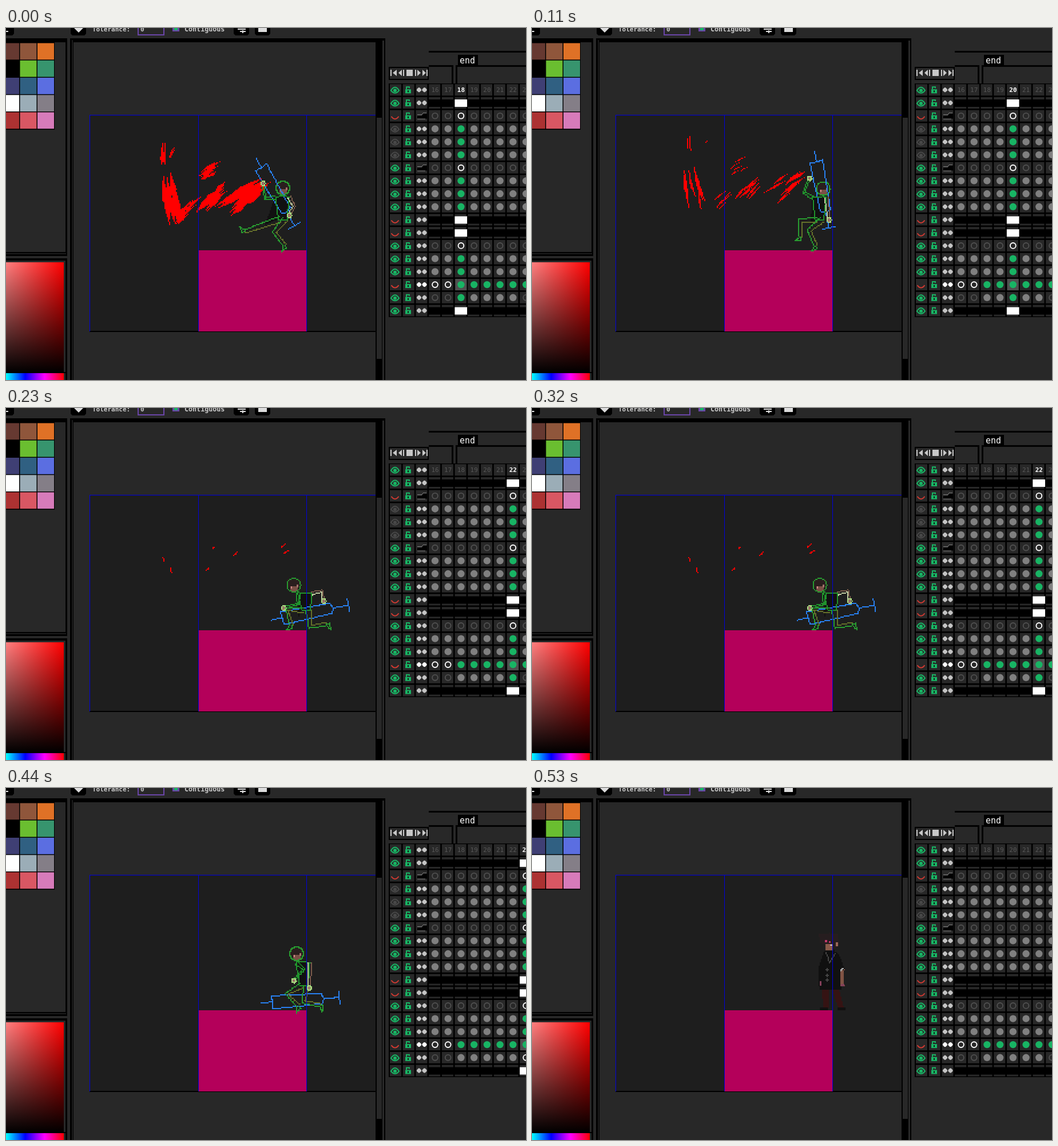
Write an HTML page with a canvas that moves like this. It is 909 px wide and 616 px high and loops after 0.56 s.

```html
<!DOCTYPE html>
<html lang="en">
<head>
<meta charset="utf-8">
<title>Pixel editor</title>
<style>
html, body { margin: 0; width: 100%; height: 100%; overflow: hidden; background: #282828; }
canvas { display: block; }
</style>
</head>
<body>
<canvas id="stage" width="909" height="616"></canvas>
<script>
const stage = document.getElementById('stage');
let g = stage.getContext('2d');
const GREY = '#282828', GREEN = '#18b464', PX = 2;
const MONO = '"DejaVu Sans Mono", monospace';

function box(color, x, y, w, h) {
  g.fillStyle = color;
  g.fillRect(x, y, w, h);
}
function dot(color, x, y, r) {
  g.fillStyle = color;
  g.beginPath();
  g.arc(x, y, r, 0, 7);
  g.fill();
}
function ring(color, x, y, r, w = 2) {
  g.strokeStyle = color;
  g.lineWidth = w;
  g.beginPath();
  g.arc(x, y, r, 0, 7);
  g.stroke();
}
function shape(color, d, x = 0, y = 0, stroke = 0) {
  g.save();
  g.translate(x, y);
  g.lineWidth = stroke;
  g.fillStyle = g.strokeStyle = color;
  stroke ? g.stroke(new Path2D(d)) : g.fill(new Path2D(d));
  g.restore();
}
function label(str, x, y, size, color, align = 'left', weight = '') {
  g.font = `${weight} ${size}px ${MONO}`;
  g.textAlign = align;
  g.fillStyle = color;
  g.fillText(str, x, y);
}

// Points and vectors
const add = (a, b, k = 1) => [a[0] + b[0] * k, a[1] + b[1] * k];
const mix = (a, b, k) => [a[0] + (b[0] - a[0]) * k, a[1] + (b[1] - a[1]) * k];
const turn = ([x, y]) => [-y, x];
const polar = (deg, r = 1) => [r * Math.cos(deg * Math.PI / 180), r * Math.sin(deg * Math.PI / 180)];
const gap = (a, b) => Math.hypot(b[0] - a[0], b[1] - a[1]);
const unit = (a, b) => {
  const d = gap(a, b) || 1;
  return [(b[0] - a[0]) / d, (b[1] - a[1]) / d];
};

// Blocky drawing on the sprite's pixel grid
const snap = v => Math.round(v / PX) * PX;

function pixelLine(color, ...pts) {
  g.fillStyle = color;
  for (let i = 1; i < pts.length; i++) {
    const n = Math.max(1, Math.ceil(gap(pts[i - 1], pts[i]) / PX));
    for (let k = 0; k <= n; k++) {
      const [x, y] = mix(pts[i - 1], pts[i], k / n);
      g.fillRect(snap(x) - 1, snap(y) - 1, PX, PX);
    }
  }
}
function pixelFill(color, ...pts) {
  g.fillStyle = color;
  const ys = pts.map(p => p[1]);
  for (let y = snap(Math.min(...ys)); y <= Math.max(...ys); y += PX) {
    const cuts = [];
    pts.forEach(([x0, y0], i) => {
      const [x1, y1] = pts[(i + 1) % pts.length];
      if ((y0 <= y) !== (y1 <= y)) cuts.push(x0 + (y - y0) * (x1 - x0) / (y1 - y0));
    });
    cuts.sort((a, b) => a - b);
    for (let i = 0; i + 1 < cuts.length; i += 2) {
      const x = snap(cuts[i]);
      g.fillRect(x - 1, y - 1, Math.max(PX, snap(cuts[i + 1]) - x), PX);
    }
  }
}
function pixelRing(color, at, r) {
  const pts = [];
  for (let a = 0; a <= 360; a += 15) pts.push(add(at, polar(a, r)));
  pixelLine(color, ...pts);
}

// Red smears: each is a bundle of spindles that drifts, thins and dies out
const smears = [
  { at: [276, 232], len: 54, wide: 9, tilt: 88, count: 5, drift: [0, -9] },
  { at: [291, 217], len: 34, wide: 4, tilt: -61, count: 3, drift: [7, -10] },
  { at: [287, 301], len: 74, wide: 30, tilt: 78, count: 18, drift: [-4, -9] },
  { at: [318, 319], len: 56, wide: 16, tilt: -44, count: 9, drift: [11, -12] },
  { at: [357, 250], len: 46, wide: 17, tilt: -32, count: 9, drift: [3, -5] },
  { at: [364, 296], len: 66, wide: 22, tilt: -43, count: 11, drift: [10, -9] },
  { at: [416, 294], len: 92, wide: 32, tilt: -36, count: 17, drift: [14, -11] }
];
function random(seed) {
  return () => {
    seed = (seed * 1664525 + 1013904223) % 4294967296;
    return seed / 4294967296;
  };
}
function drawSmear({ at, len, wide, tilt, count, drift }, seed, age) {
  const rnd = random(seed * 7919 + 17);
  rnd();
  for (let i = 0; i < count; i++) {
    const u = rnd() - 0.5, v = rnd() - 0.5;
    const dir = polar(tilt + (rnd() - 0.5) * 14), side = turn(dir);
    const reach = len * (0.2 + 0.22 * rnd()) * (1 - 0.15 * age);
    const thick = wide * (0.1 + 0.1 * rnd()) * (1 - age / 4);
    const life = i / count;
    if (life < age * 0.21) continue;
    let mid = add(at, drift, age);
    mid = add(mid, dir, u * len * 0.6);
    mid = add(mid, side, v * wide * (0.9 + 0.15 * age));
    const tail = add(mid, dir, -reach), tip = add(mid, dir, reach);
    if (thick < 0.6) pixelLine('#f00', mix(tail, tip, 0.3), mix(tail, tip, 0.7));
    else pixelFill('#f00', tail, add(mid, side, thick), tip, add(mid, side, -thick));
  }
}

// Key points of each pose; elbows, knees, feet and blade follow from them
const poses = [
  { ms: 60, head: [484, 280], hip: [483, 335], hands: [[449, 272], [495, 328]], ankles: [[418, 356], [487, 380]], sword: [437, 227, 60.5] },
  { ms: 50, head: [503, 281], hip: [496, 335], hands: [[474, 264], [511, 333]], ankles: [[434, 353], [497, 380]], sword: [475, 217, 74.7] },
  { ms: 50, head: [509, 281], hip: [502, 336], hands: [[485, 263], [519, 336]], ankles: [[470, 366], [496, 381]], sword: [494, 215, 79.7] },
  { ms: 70, head: [505, 304], hip: [521, 350], hands: [[477, 346], [551, 338]], ankles: [[493, 380], [553, 378]], sword: [454, 366, -5] },
  { ms: 150, head: [503, 310], hip: [524, 354], hands: [[485, 350], [555, 338]], ankles: [[499, 380], [560, 378]], sword: [464, 371, -11] },
  { ms: 100, head: [508, 290], hip: [520, 346], hands: [[503, 337], [530, 350]], ankles: [[511, 381], [549, 380]], sword: [446, 376, -4] },
  { ms: 80 }
];

// Middle joint of a two-bone limb
function bend(a, b, la, lb, side) {
  const d = gap(a, b), dir = unit(a, b);
  const along = d > la + lb ? d * la / (la + lb) : (la * la - lb * lb + d * d) / (2 * d);
  const out = Math.sqrt(Math.max(0, la * la - along * along)) * (d < la + lb);
  return add(add(a, dir, along), turn(dir), side * out);
}
function limb(colors, a, j, b, w) {
  const n1 = turn(unit(a, j)), n2 = turn(unit(j, b));
  [w, -w].forEach((k, i) => pixelLine(colors[i],
    add(a, n1, k), add(j, mix(n1, n2, 0.5), k * 0.85), add(b, n2, k * 0.6)));
}
function drawLeg(hip, ankle) {
  const knee = bend(hip, ankle, 29, 29, 1), shin = unit(knee, ankle);
  limb(['#289c30', '#66702a'], hip, knee, ankle, 5);
  const heel = add(ankle, shin, 6), toe = add(heel, turn(shin), 11);
  pixelLine('#289c30', add(ankle, turn(shin), 3), toe, heel, ankle);
}
function drawSword([x, y, deg]) {
  const dir = polar(deg), side = turn(dir);
  const at = (along, across) => add(add([x, y], dir, along), side, across);
  const c = '#2880f0';
  pixelLine(c, at(0, 0), at(18, 0));
  pixelLine(c, at(20, 0), at(18, -11), at(106, -9), at(110, 0), at(106, 9), at(20, 12), at(20, 0));
  pixelLine(c, at(110, 0), at(137, 0));
  pixelLine(c, at(137, -11), at(137, 11));
}
function drawHead([x, y]) {
  box('#2a1e1e', x - 12, y - 10, 25, 14);
  box('#7a5046', x - 6, y + 2, 13, 9);
  box('#d08888', x - 5, y + 2, 2, 4);
  box('#a07068', x + 5, y - 1, 3, 5);
  pixelRing('#289c30', [x, y], 12);
}
function drawFighter({ head, hip, hands, ankles, sword }) {
  const neck = add(head, unit(head, hip), 14);
  const chest = [neck[0] + (hip[0] - neck[0]) * 0.9, neck[1] + 2];
  const shoulders = [add(chest, [-12, 0]), add(chest, [12, 0])];
  const hips = [add(hip, [-7, 0]), add(hip, [8, 0])];
  const tail = mix(hip, ankles[0], 0.45);
  pixelFill('#111', shoulders[0], shoulders[1], hips[1], hips[0], tail);
  drawHead(head);
  drawSword(sword);
  ankles.forEach((a, i) => drawLeg(mix(hip, hips[i], 0.6), a));
  pixelLine('#20922c', shoulders[0], hips[0], hips[1], shoulders[1], neck, shoulders[0]);
  const sleeves = [['#20922c', '#20922c'], ['#c0cba0', '#7a5a4a']];
  hands.forEach((h, i) => {
    const s = shoulders[i];
    limb(sleeves[i], s, bend(s, h, 18, i ? 18 : 27, -1), h, 3);
    box('#9a7268', h[0] - 3, h[1] - 3, 6, 6);
    pixelRing('#a8dd80', h, 4);
  });
}
function drawStanding() {
  for (const [x, lean] of [[508, 4], [526, 12]]) {
    pixelFill('#351313', [x, 352], [x + 12, 352], [x + 8 + lean, 385], [x + lean - 2, 385]);
    box('#121010', x + lean * 1.6 - 11, 384, 14, 5);
  }
  pixelFill('#101010', [511, 286], [528, 284], [538, 292], [548, 318], [541, 322], [542, 352], [505, 353], [501, 340], [503, 310]);
  pixelFill('#805344', [540, 320], [545, 318], [547, 346], [540, 347]);
  pixelFill('#261d1f', [502, 256], [520, 254], [536, 255], [538, 276], [528, 282], [505, 271]);
  box('#8a5a4a', 513, 273, 13, 11);
  box('#c0386a', 512, 266, 4, 4);
  box('#c0386a', 519, 268, 3, 3);
  box('#9a6658', 531, 270, 4, 7);
  box('#cfc5c5', 521, 274, 4, 2);
  pixelLine('#454545', [514, 288], [520, 305], [529, 290]);
  for (let y = 318; y < 340; y += 9) {
    pixelLine('#454545', [514, y], [518, y]);
    pixelLine('#454545', [516, y - 2], [516, y + 2]);
  }
  pixelLine('#a8a8a8', [539, 319], [544, 315]);
  box('#84405a', 503, 338, 3, 8);
  box('#84405a', 540, 343, 6, 4);
}

// Timeline
const STEP = 22.72, rowY = i => 108.3 + STEP * i, colX = f => 750 + STEP * (f - 16);
const rowKinds = 'nbrdddrdddbbrddgmb';
const shut = [2, 10, 11, 15], dim = [3, 4, 5], folders = [2, 6];

function drawEye(i, y) {
  if (shut.includes(i)) return shape('#d03a32', 'M-6.5 1Q0 10 6.5 1', 680, y, 2);
  const c = dim.includes(i) ? '#484848' : GREEN;
  shape(c, 'M-7 1Q0-10 7 1Q0 10-7 1Z', 680, y, 2);
  dot(c, 680, y + 1, 3);
}
function drawRowIcons(i) {
  const y = rowY(i);
  drawEye(i, y);
  box(GREEN, 698, y - 1, 10, 7);
  box('#111', 702, y + 1, 2, 3);
  shape(GREEN, 'M-3-1V-5H2V-3', 703, y, 2);
  if (folders.includes(i)) {
    shape('#888', 'M-8-2H0L2-5H8', 727, y, 1);
    shape('#000', 'M-8 5V0H0L2-4H9V5Z', 727, y);
    shape('#888', 'M-8 5.5H6', 727, y, 1);
  } else {
    const diamond = 'M-4-1L-1-4H1L4-1V1L1 4H-1L-4 1Z';
    for (const x of [722, 731.5]) shape(i === 15 ? '#fff' : '#c4c4c4', diamond, x, y);
  }
}
function drawCell(kind, f, y, now) {
  const x = colX(f), on = f === now;
  const circle = c => ring(c, x, y, 4.9, 1.9);
  if (kind === 'n') return label(f, x, y + 4, 11, on ? '#fff' : '#585858', 'center', on ? 'bold' : '');
  if (kind === 'b') {
    box('#000', x - 12, y - 6, 23, 13);
    if (on) box('#fff', x - 11, y - 6, 22, 13);
    return;
  }
  if (kind === 'g') {
    if (on) box('#505050', x - 10, y - 10, 20, 20);
    return f < 18 ? circle('#fff') : dot(GREEN, x, y, 6.2);
  }
  const hollow = kind === 'r' || kind === 'm' && (f < 18 || f > 22);
  if (hollow) circle(on ? '#fff' : '#505050');
  else dot(on ? GREEN : '#808080', x, y, 6.2);
}
function drawTimeline(now) {
  [...rowKinds].forEach((kind, i) => {
    for (let f = 16; f <= 23; f++) drawCell(kind, f, rowY(i), now);
  });
}

function drawPalette() {
  box('#000', 0, 18, 107, 381);
  box(GREY, 0, 25, 104, 367);
  box('#1c1c1c', 0, 394, 105, 2);
  box('#000', 0, 25, 85, 153);
  const swatches = [
    '#663931 #8f563b #df7126', '#000 #6abe30 #37946e', '#3f3f74 #306082 #5b6ee1',
    '#fff #9badb7 #847e87', '#ac3232 #d95763 #d77bba'];
  swatches.forEach((row, r) => row.split(' ').forEach((c, k) =>
    box(c, k * 30.5 - 6, 26.5 + r * 30.25, 29, 28.8)));
}
function ramp(x0, y0, x1, y1, stops) {
  const r = g.createLinearGradient(x0, y0, x1, y1);
  stops.forEach((c, i) => r.addColorStop(i / (stops.length - 1), c));
  return r;
}
function drawPicker() {
  box('#000', 0, 403, 107, 213);
  box(GREY, 0, 407, 104, 209);
  box(ramp(0, 0, 101, 0, ['#ff8080', '#f00']), 0, 410, 101, 193);
  box(ramp(0, 410, 0, 603, ['#0000', '#000']), 0, 410, 101, 193);
  box('#000', 0, 602, 104, 2);
  box(ramp(0, 0, 101, 0, ['#0ff', '#00f', '#f0f', '#f00']), 0, 604, 101, 12);
}
function drawToolbar() {
  const button = x => shape('#000', 'M0 0H27V10L24 13H3L0 10Z', x, 0);
  [-13, 113, 398, 435].forEach(button);
  box('#ddd', 0, 5, 4, 2);
  shape('#ddd', 'M119 0H135L127 8Z');
  label('Tolerance:', 151, 6, 11, '#ccc', 'left', 'bold');
  box('#6a45a8', 230, 0, 47, 13);
  box(GREY, 232, 0, 43, 11);
  label('0', 235, 6, 11, '#ccc', 'left', 'bold');
  box('#6a45a8', 291, 0, 12, 6);
  box(GREEN, 294, 0, 6, 4);
  label('Contiguous', 312, 6, 11.7, '#ccc', 'left', 'bold');
  shape('#ddd', 'M405 2H419M409 6H419M414 4V9', 0, 0, 2);
  box('#ddd', 441, 0, 15, 7);
}
function drawCanvasPanel() {
  box('#000', 112, 18, 551, 598);
  box(GREY, 118, 25, 528, 591);
  box('#1c1c1c', 115, 21, 2, 595);
  box('#000', 646, 25, 12, 591);
  box(GREY, 648, 157, 9, 422);
  box(GREY, 658, 22, 3, 594);
  box('#1e1e1e', 146, 152, 500, 379);
  box('#000', 146, 530, 500, 2);
  box('#b4005a', 337, 389, 188, 142);
}
function drawTimelineFrame() {
  box('#000', 739, 40, 170, 3);
  box('#000', 739, 65, 43, 3);
  box('#000', 779, 65, 3, 32);
  box('#000', 786, 65, 123, 3);
  box('#000', 786, 65, 3, 32);
  box('#000', 790, 47, 35, 20);
  label('end', 793, 62, 15, '#fff');
  box('#000', 669, 68, 70, 23);
  box(GREY, 671, 70, 66, 19);
  const c = '#c8c8c8';
  box(c, 672, 73, 2, 11);
  shape(c, 'M683 73V84L676 78.5ZM692 73V84L686 78.5ZM694 73H696V84H694ZM715 73H717V84H715ZM719 73V84L725 78.5ZM728 73V84L734 78.5ZM735 73H737V84H735Z');
  box(c, 700, 73, 11, 11);
  box('#000', 669, 97, 240, 409);
  for (let i = 0; i < 18; i++) {
    for (let k = 0; k < 11; k++) box(GREY, 671 + k * STEP, rowY(i) - 10, 20, 20);
    drawRowIcons(i);
  }
}
function drawGuides() {
  const c = '#0000e0';
  box(c, 146, 152, 500, 1);
  for (let i = 0; i < 3; i++) box(c, Math.round(146 + i * 189.6), 152, 1, 379);
}

// The parts that never change are drawn once
const screen = g, still = document.createElement('canvas');
still.width = 909;
still.height = 616;
g = still.getContext('2d');
box(GREY, 0, 0, 909, 616);
[drawToolbar, drawPalette, drawPicker, drawCanvasPanel, drawTimelineFrame].forEach(draw => draw());
g = screen;

function drawPose(n) {
  g.drawImage(still, 0, 0);
  if (n < 5) smears.forEach((s, i) => drawSmear(s, i + 1, n));
  poses[n].head ? drawFighter(poses[n]) : drawStanding();
  drawGuides();
  drawTimeline(18 + n);
}

const loop = poses.reduce((sum, p) => sum + p.ms, 0);
const start = performance.now();
let shown = -1;
function tick() {
  let t = (performance.now() - start) % loop, n = 0;
  while (t >= poses[n].ms) t -= poses[n++].ms;
  if (n !== shown) drawPose(shown = n);
  requestAnimationFrame(tick);
}
tick();
</script>
</body>
</html>
```
